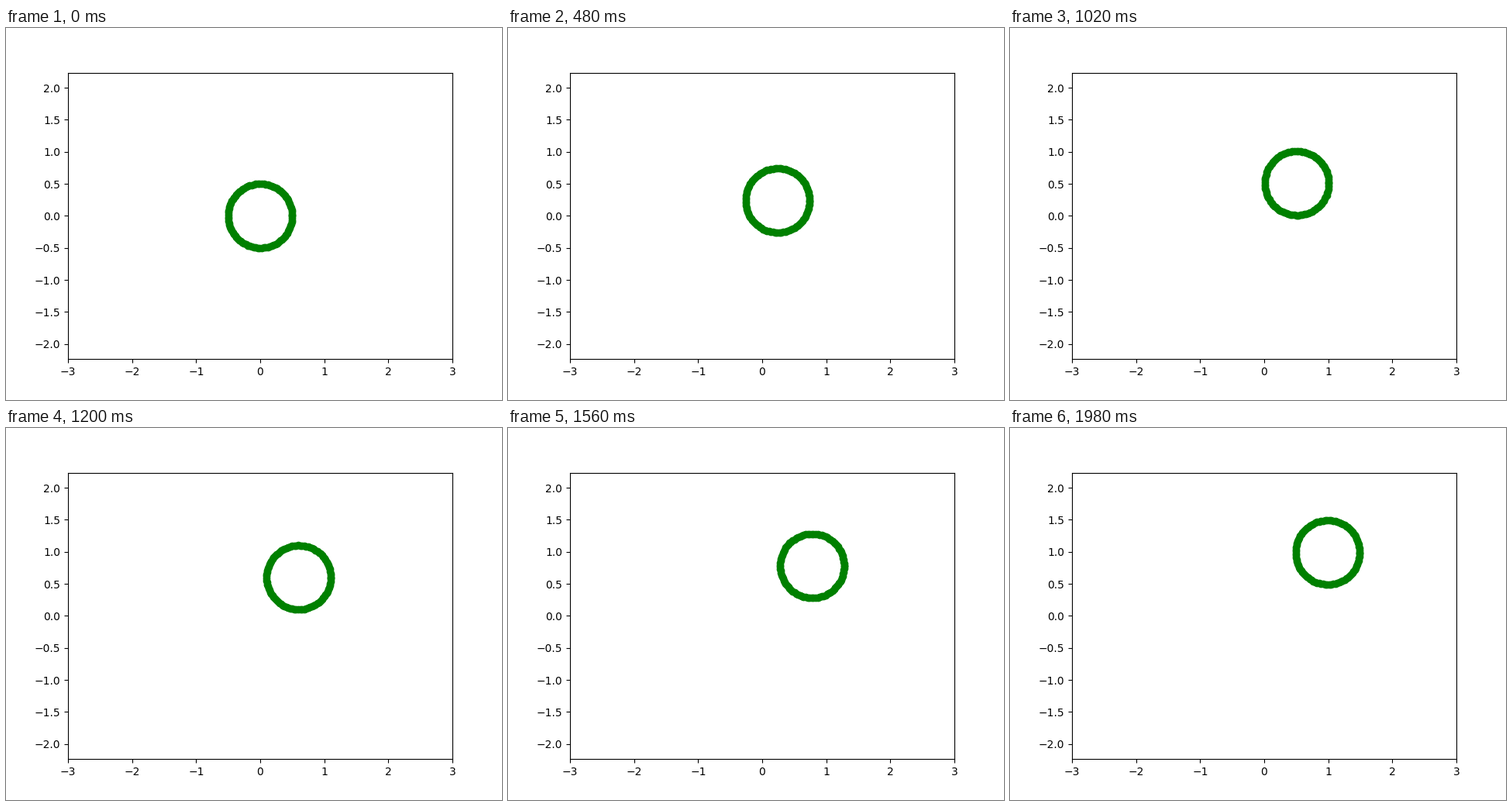
A matplotlib script that plays this animation: 640x480 px, repeating every 2 s.

```python
import numpy as np
import matplotlib.pyplot as plt
from matplotlib.animation import FuncAnimation

FRAMES = 100
RADIUS = 0.5

fig, ax = plt.subplots(figsize=(6.4, 4.8), dpi=100)
ax.set_aspect("equal", adjustable="datalim")
ax.set_xlim(-3, 3)
half_height = 3 * (4.8 * 0.77) / (6.4 * 0.775)
ax.set_ylim(-half_height, half_height)

theta = np.linspace(0, 2 * np.pi, 100)
ring_x, ring_y = RADIUS * np.cos(theta), RADIUS * np.sin(theta)
ring, = ax.plot([], [], "o", color="green")


def update(i):
    shift = i / FRAMES
    ring.set_data(ring_x + shift, ring_y + shift)
    return ring,


anim = FuncAnimation(fig, update, frames=FRAMES, init_func=lambda: update(0),
                     interval=20, repeat=True, repeat_delay=0)
plt.show()
```
